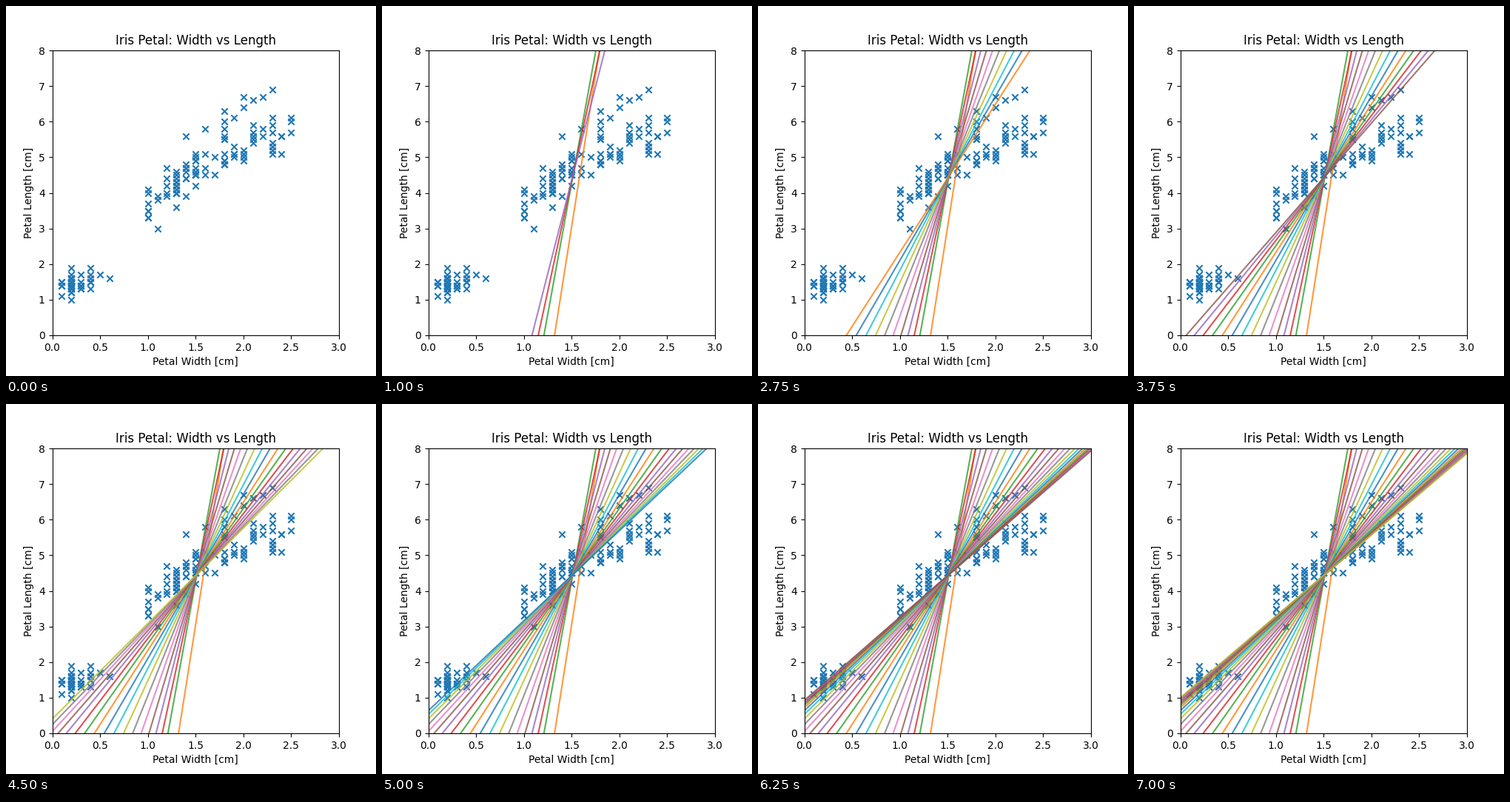
These frames come from a looping animation (500x500 px, 7250 ms). A matplotlib script:

```python
from itertools import chain

import matplotlib.pyplot as plt
import numpy as np
from matplotlib.animation import FuncAnimation

FRAMES = 29
INTERVAL = 250
RATE = 0.1
STEPS_PER_FRAME = 10

# Petal lengths in mm, one list for each petal width.
WIDTHS = chain(range(1, 7), range(10, 26))
LENGTHS = [
    [11] + [14] * 2 + [15] * 2,
    [10, 12, 12] + [13] * 4 + [14] * 8 + [15] * 7 + [16] * 5 + [17, 19],
    [13, 13] + [14] * 3 + [15, 17],
    [13] + [15] * 3 + [16, 17, 19],
    [17],
    [16],
    [33, 33, 35, 35, 37, 40, 41],
    [30, 38, 39],
    [39, 40, 42, 44, 47],
    [36] + [40] * 3 + [41, 41, 42, 42, 43, 43, 44, 45, 46],
    [39, 44, 44, 46, 47, 47, 48, 56],
    [42] + [45] * 5 + [46, 47, 49, 49, 50, 51],
    [45, 47, 51, 58],
    [45, 50],
    [48] * 3 + [49, 49, 51, 55, 55, 56, 58, 60, 63],
    [50, 51, 51, 53, 61],
    [49, 50, 51, 52, 64, 67],
    [54, 55, 56, 57, 59, 66],
    [56, 58, 67],
    [51, 52, 53, 54, 57, 59, 61, 69],
    [51, 56, 56],
    [57, 60, 61],
]
points = [(w / 10, l / 10) for w, col in zip(WIDTHS, LENGTHS) for l in col]
width, length = np.array(points).T


def descend(start, count):
    """Return (intercept, slope) pairs along a least-squares descent."""
    design = np.column_stack([np.ones_like(width), width])
    theta = np.array(start)
    path = [theta]
    for _ in range(count - 1):
        for _ in range(STEPS_PER_FRAME):
            error = design @ theta - length
            theta = theta - RATE * design.T @ error / len(length)
        path.append(theta)
    return path


fig, ax = plt.subplots(figsize=(5, 5), dpi=100)
ax.scatter(width, length, marker="x", color="C0")
ax.set(xlim=(0, 3), ylim=(0, 8), title="Iris Petal: Width vs Length",
       xlabel="Petal Width [cm]", ylabel="Petal Length [cm]")

span = np.array([0, 3])
fits = [
    ax.plot(span, b + m * span, color=f"C{k % 10}", alpha=0.8, visible=False)[0]
    for k, (b, m) in enumerate(descend((-22.54, 17.06), FRAMES - 1), start=1)
]


def update(frame):
    for k, fit in enumerate(fits):
        fit.set_visible(k < frame)
    return fits


anim = FuncAnimation(fig, update, frames=FRAMES, interval=INTERVAL,
                     repeat=True, repeat_delay=0)
plt.show()
```
